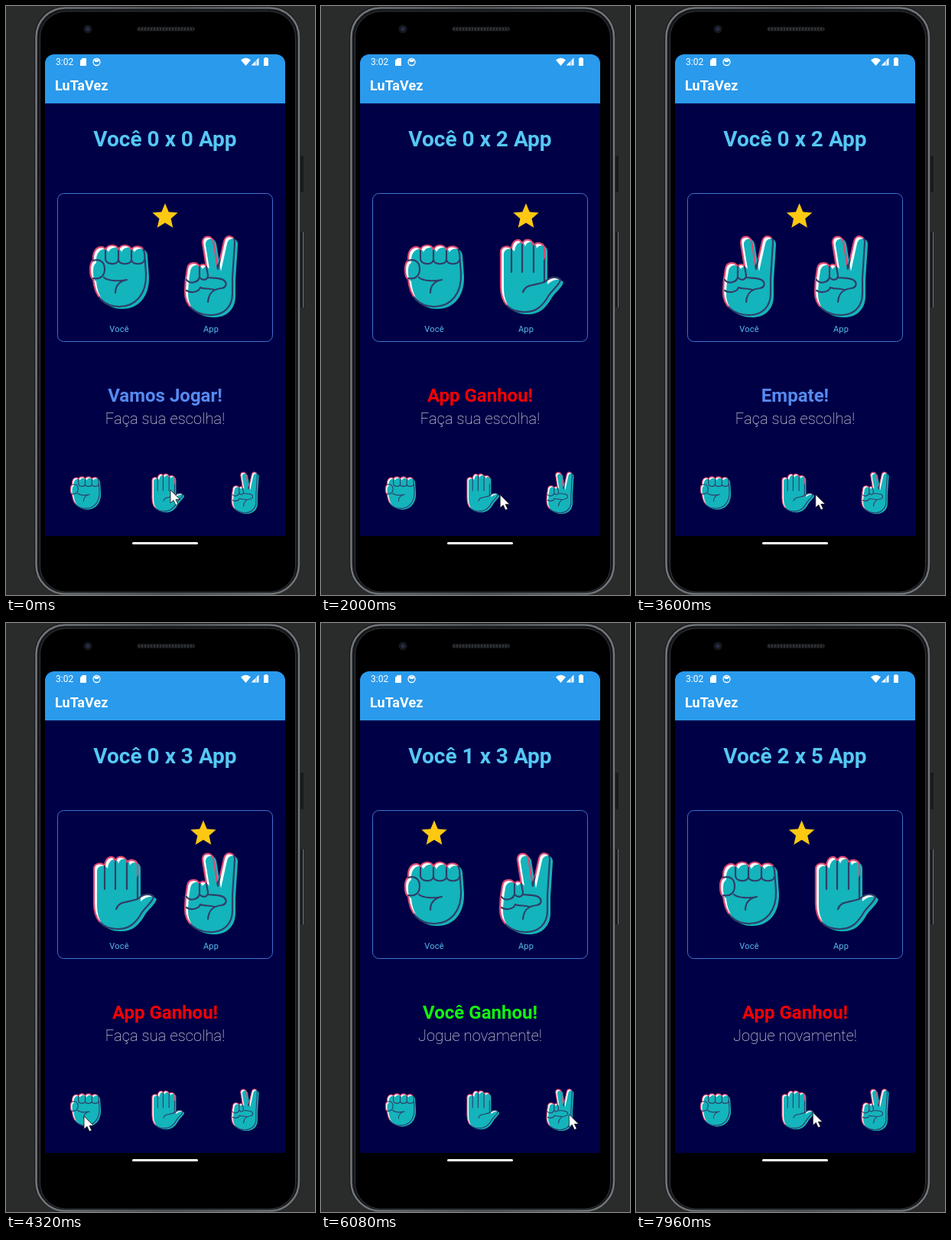
Write an HTML page that moves like this. It is 404 px wide and 768 px high and loops after 8 s.

```html
<!DOCTYPE html>
<html lang="pt">
<head>
<meta charset="utf-8">
<style>
  html, body { margin: 0; width: 100%; height: 100%; overflow: hidden; background: #2a2c2c; }
  svg { display: block; width: 404px; height: 768px; }
  text { font-family: Roboto, sans-serif; }
  .mid { text-anchor: middle; }
  .bold { font-weight: 700; }
  .label { font-size: 11px; letter-spacing: .2px; fill: #55bdf0; }
</style>
</head>
<body>
<svg viewBox="0 0 404 768">
  <defs>
    <linearGradient id="edge" x1="0" y1="0" x2="1" y2="1">
      <stop offset=".5" stop-color="#dc4a72"/>
      <stop offset=".5" stop-color="#2f3f68"/>
    </linearGradient>
    <linearGradient id="rim">
      <stop offset="0" stop-color="#74777b"/>
      <stop offset=".5" stop-color="#55585b"/>
      <stop offset="1" stop-color="#74777b"/>
    </linearGradient>
  </defs>

  <!-- phone -->
  <rect x="385" y="195" width="4" height="48" rx="1" fill="#191b1b"/>
  <rect x="385" y="295" width="4" height="98" rx="1" fill="#191b1b"/>
  <path d="M388.5 295V393" stroke="#707376"/>
  <rect x="37" y="0" width="348" height="768" rx="40" fill="#181a1c"/>
  <rect x="39.500" y="2.500" width="343.500" height="764" rx="38" fill="#15171a" stroke="url(#rim)" stroke-width="2.500"/>
  <rect x="44.500" y="7" width="334" height="757" rx="34" fill="#000" stroke="#33363a"/>
  <circle cx="107" cy="30" r="5.500" fill="#15171f"/>
  <circle cx="107" cy="30" r="2.500" fill="#2a2d42"/>
  <rect x="171" y="27" width="76" height="6" rx="3" fill="#16181a"/>
  <path d="M173 30H246" stroke="#34373a" stroke-width="3" stroke-dasharray="2 2"/>

  <!-- screen -->
  <path d="M51 691V75a12 12 0 0 1 12-12H353a12 12 0 0 1 12 12V691Z" fill="#000046"/>
  <path d="M51 127V75a12 12 0 0 1 12-12H353a12 12 0 0 1 12 12V127Z" fill="#2a9aec"/>
  <g fill="#fff">
    <text x="65" y="77" font-size="12">3:02</text>
    <path d="M100 68h5v10h-8v-7Z"/>
    <circle cx="118.500" cy="73" r="4.500" fill="none" stroke="#fff" stroke-width="1.300"/>
    <path d="M115 70h7l-1.500 3h-4Z"/>
    <path d="M307 70.500Q313.500 65 320 70.500L313.500 78ZM330.500 67.500V77.500H320.500Z"/>
    <path d="M327 71V77" stroke="#2a9aec"/>
    <path d="M338.500 68v-1h3v1h1.500v10h-6v-10Z"/>
    <text class="bold" x="64" y="110" font-size="18">LuTaVez</text>
  </g>
  <path d="M166.500 700.500H249.500" stroke="#fff" stroke-width="3" stroke-linecap="round"/>

  <text id="score" class="mid bold" x="208" y="183" font-size="28" fill="#55c8f4"></text>
  <rect x="67.500" y="244.500" width="281" height="193" rx="8" fill="none" stroke="#3f72cc"/>
  <text class="mid label" x="148" y="425">Você</text>
  <text class="mid label" x="268" y="425">App</text>
  <text id="result" class="mid bold" x="208" y="516" font-size="24"></text>
  <text id="hint" class="mid" x="208" y="545" font-size="20" font-weight="200" letter-spacing=".15" fill="#fff"></text>

  <use id="you" x="148" y="353"/>
  <use id="app" x="268" y="353"/>
  <use href="#rock" transform="translate(104 635) scale(.515)"/>
  <use href="#paper" transform="translate(208 635) scale(.515)"/>
  <use href="#scissors" transform="translate(312.500 635) scale(.515)"/>

  <path id="star" fill="#fdc812" d="M0 8.800L10.300 15 7.600 3.300 16.700-4.600 4.700-5.600 0-16.700-4.700-5.600-16.700-4.600-7.600 3.300-10.300 15Z"/>
  <path id="cursor" d="M0 0V17L4 13.500 7 20 10 18.500 7 12.500H12.500Z" fill="#fff" stroke="#111" stroke-width=".8"/>
</svg>
<script>
const LOOP = 8000, SLIDE = 500;
const $ = id => document.getElementById(id);

// Each hand: silhouette and inner creases, centred on its image.
const hands = {
  rock: [
    'M-38-10C-38-16-37-19-34-21V-26C-33-40-20-42-18-35C-15-43-3-43-1-35C2-43 13-43 16-35C19-42 32-41 33-31L35-4C36 22 22 39 0 39C-20 39-32 26-34 3C-37 2-38-3-38-10Z',
    'M-18-34V-23C-17-15-2-15-1-22V-34M-1-22C0-15 15-15 16-22V-34M16-22C17-15 32-15 33-22M-34-21C-24-24-19-18-19-10C-19-1-25 4-34 2M-20 1C-14 6 0 6 10 4C0 6-5 12-5 21'],
  paper: [
    'M-33 12V-32C-33-41-22-41-19-36C-18-50-6-51-5-42C-3-51 9-50 10-40C13-46 24-45 24-36V7C32 0 38-1 44 3C48 6 34 18 30 24C22 38 14 46-2 46C-22 46-33 34-33 12Z',
    'M-19-36V-6M-5-42V-6M10-40V-6M-4 20C0 9 10 12 24 7'],
  scissors: [
    'M-34 20C-34 12-33 0-31-10C-30-20-18-20-15-13C-13-17-8-17-6-13L-11-44C-12-54 1-55 3-46L9-10 17-46C19-56 32-54 31-44L28 2V22C28 40 16 50 0 50C-20 50-34 38-34 20Z',
    'M-32 4C-28 10-16 8-15 0V-13M-15 1C-10 6-4 4-4-2L-6-13M-4 1C2 2 10 1 16 4C22 8 20 14 14 15C4 16-3 20-4 33M-32 18C-26 22-16 20-14 14C-10 16-2 15 4 17']
};
const defs = document.querySelector('defs');
for (const [name, [shape, creases]] of Object.entries(hands)) {
  defs.innerHTML += `<g id="${name}" stroke-width="2.2" stroke-linejoin="round" stroke-linecap="round">
    <path d="${shape}" fill="#fff"/>
    <path d="${shape}" fill="#14b4bc" transform="translate(4 3)"/>
    <path d="${shape}" fill="none" stroke="url(#edge)"/>
    <path d="${creases}" fill="none" stroke="#2f3f68"/></g>`;
}

const START = ['Vamos Jogar!', '#568af0'], DRAW = ['Empate!', '#568af0'];
const LOST = ['App Ganhou!', '#f80000'], WON = ['Você Ganhou!', '#12f80c'];
const starGoal = new Map([[START, 208], [DRAW, 208], [LOST, 268], [WON, 148]]);

// time, player's hand, app's hand, score, outcome
const rounds = [
  [0, 'rock', 'scissors', '0 x 0', START],
  [400, 'paper', 'scissors', '0 x 1', LOST],
  [1400, 'rock', 'paper', '0 x 2', LOST],
  [3200, 'scissors', 'scissors', '0 x 2', DRAW],
  [3955, 'paper', 'scissors', '0 x 3', LOST],
  [4700, 'rock', 'scissors', '1 x 3', WON],
  [6200, 'scissors', 'rock', '1 x 4', LOST],
  [6900, 'paper', 'rock', '2 x 4', WON],
  [7688, 'rock', 'paper', '2 x 5', LOST]
];
const firstWin = rounds.find(r => r[4] === WON)[0];

// time, x, y of the pointer tip
const pointer = [
  [0, 215, 631], [800, 213, 632], [1000, 169, 634], [1200, 109, 638], [1480, 109, 638],
  [2300, 306, 637], [3240, 307, 637], [3700, 215, 637], [3980, 215, 637],
  [4300, 102, 643], [4740, 102, 643], [5500, 322, 640], [6240, 325, 641],
  [6650, 215, 637], [6920, 215, 637], [7220, 110, 639], [7700, 110, 639],
  [7960, 231, 638], [8000, 243, 638]
];

const ease = u => (1 - Math.cos(Math.PI * Math.min(1, u))) / 2;

function pointerAt(t) {
  const i = pointer.findIndex(p => p[0] > t);
  const [t0, x0, y0] = pointer[i - 1], [t1, x1, y1] = pointer[i];
  const k = (t - t0) / (t1 - t0);
  return [x0 + (x1 - x0) * k, y0 + (y1 - y0) * k];
}

// Every round sends the star on from wherever it is.
function starAt(t) {
  let x = 208;
  rounds.forEach(([begin, , , , outcome], i) => {
    if (begin > t) return;
    const end = Math.min(t, rounds[i + 1]?.[0] ?? LOOP);
    x += (starGoal.get(outcome) - x) * ease((end - begin) / SLIDE);
  });
  return x;
}

function draw() {
  const t = performance.now() % LOOP;
  const [, you, app, score, [message, color]] = rounds.findLast(r => r[0] <= t);
  $('you').setAttribute('href', '#' + you);
  $('app').setAttribute('href', '#' + app);
  $('score').textContent = `Você ${score} App`;
  $('result').textContent = message;
  $('result').setAttribute('fill', color);
  $('hint').textContent = t < firstWin ? 'Faça sua escolha!' : 'Jogue novamente!';
  $('star').setAttribute('transform', `translate(${starAt(t)} 274)`);
  $('cursor').setAttribute('transform', `translate(${pointerAt(t)})`);
  requestAnimationFrame(draw);
}
draw();
</script>
</body>
</html>
```
